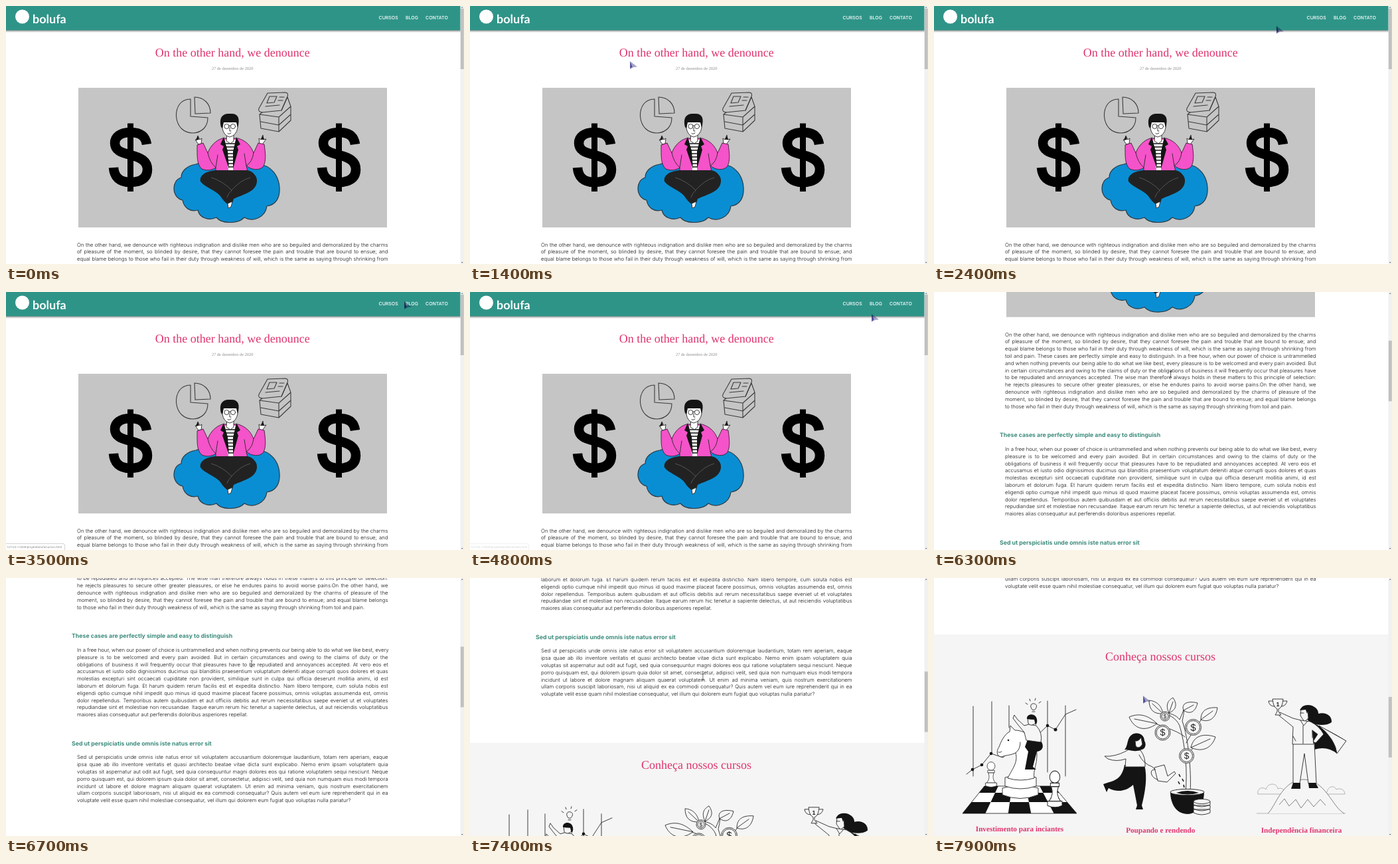
An HTML page that plays this animation: 690x388 px, repeating every 8 s.

```html
<!DOCTYPE html>
<html lang="pt-BR">
<head>
<meta charset="utf-8">
<title>Blog</title>
<style>
html, body { margin: 0; width: 100%; height: 100%; overflow: hidden; background: #fff; }
#stage { position: relative; width: 690px; height: 388px; overflow: hidden; background: #fff; text-rendering: geometricPrecision; }
#page, svg { position: absolute; left: 0; top: 0; }
svg { overflow: visible; }
#pointer { mix-blend-mode: multiply; }
.para { position: absolute; left: 107px; width: 468.5px; font: 300 7.75px/10.8px Inter, sans-serif; color: #111; }
.para div { white-space: nowrap; text-align: justify; text-align-last: justify; }
.para div:last-child { text-align-last: left; }
.nav { font: 500 7px Inter, sans-serif; fill: #fff; }
.title { font: 18px "Liberation Serif", serif; fill: #e0336e; text-anchor: middle; }
.date { font: 6.35px "Liberation Serif", serif; fill: #8a8a8a; text-anchor: middle; }
.head { font: 700 8.75px Inter, sans-serif; fill: #3d8c7c; }
.label { font: bold 11.2px "Liberation Serif", serif; fill: #e0336e; text-anchor: middle; }
.coin { font: 12px "Liberation Sans", sans-serif; fill: #222; text-anchor: middle; }
.status { font: 4.3px "Open Sans", sans-serif; fill: #777; }
.ln { fill: none; stroke: #2a2a2a; stroke-width: .9; stroke-linecap: round; stroke-linejoin: round; }
.wh { fill: #fff; stroke: #2a2a2a; stroke-width: .9; stroke-linejoin: round; }
.pl { fill: #f5f5f5; stroke: #2a2a2a; stroke-width: .9; stroke-linejoin: round; }
.bk { fill: #141414; }
.pale { fill: none; stroke: #999; stroke-width: .7; }
</style>
</head>
<body>
<div id="stage">
  <div id="page">
    <svg width="690" height="1140" viewBox="0 0 690 1140">
      <defs>
        <linearGradient id="shade" x2="0" y2="1">
          <stop stop-color="#000" stop-opacity=".45"/><stop offset="1" stop-color="#000" stop-opacity="0"/>
        </linearGradient>
        <g id="dollar">
          <path d="M212 208C210 195 201 190 187.500 190C172 190 164 197 164 206C164 217 173 220.500 187.500 224C203 228 213 233 213 246C213 259 203 265 187.500 265C171 265 163 257 162 243" fill="none" stroke="#000" stroke-width="14.500"/>
          <rect x="183" y="176.500" width="9" height="102.500"/>
        </g>
        <g id="pawn">
          <path class="wh" d="M-5 12C-2 19 -4 25 -8 29L8 29C4 25 2 19 5 12Z"/>
          <path class="wh" d="M-10 29H10V34Q0 38 -10 34Z"/>
          <path class="wh" d="M-6 8H6V12H-6Z"/>
          <circle class="wh" r="7" cy="1"/>
        </g>
      </defs>

      <rect y="36" width="685" height="4" fill="url(#shade)"/>
      <rect width="685" height="36.500" fill="#2f9488"/>
      <circle cx="24.500" cy="16" r="10.500" fill="#fff"/>
      <text x="40" y="25.500" style="font:700 18px Lato,sans-serif;fill:#fff">bolufa</text>
      <g class="nav">
        <text x="561.500" y="20">CURSOS</text><text x="602" y="20">BLOG</text><text x="632" y="20">CONTATO</text>
      </g>
      <text class="title" x="341.200" y="75.500">On the other hand, we denounce</text>
      <text class="date" x="341.200" y="96.300">27 de dezembro de 2020</text>

      <rect x="109" y="123" width="465" height="210" fill="#c5c5c5"/>
      <use href="#dollar"/><use href="#dollar" x="314"/>

      <!-- pie chart and papers -->
      <g class="ln" style="stroke:#3c3c3c;stroke-width:1.1">
        <path d="M278 140C263 140 256 152 256.500 166C258 182 268 191 282 191C296 190 304 181 304 168L278 166Z"/>
        <path d="M284 137C298 137 308 147 308 161L285 162Z"/>
        <path d="M394 131L421 130Q426 131 424 136L415 157L386 160Q379 159 381 154Z"/>
        <path d="M397 136l11 0l-4 9l-11 1ZM412 137h7M410 142h7M391 151l21 -2"/>
        <path d="M382 163L386 160M415 157L424 137L429 151L411 167L382 163L384 184L411 189L429 172V151M411 167V189M384 174L411 179L429 163"/>
      </g>

      <!-- figure on a cloud -->
      <path d="M264 258C249 262 249 288 266 292C268 304 278 310 289 307C292 320 307 323 317 318C326 329 351 327 359 318C373 326 391 317 393 301C407 299 413 288 412 273C411 255 399 239 380 238C360 234 300 232 286 238C273 240 264 248 264 258Z" fill="#0a8ed3" stroke="#2b3a44" stroke-width="1.200"/>
      <path class="wh" d="M290 208L285 201L288 202L289 195L292 201L295 199L294 207ZM382 207L381 199L384 201L387 194L388 201L392 200L386 208Z"/>
      <path class="bk" d="M286 201l3 -6l2 6ZM384 201l3 -6l2 6Z"/>
      <path d="M326 199C316 202 308 210 304 221L297 206L288 209C288 225 287 238 295 245C304 249 312 246 316 243L316 249L364 249L362 240C370 247 382 248 388 241C392 232 391 222 389 208L380 206L373 221C369 210 362 203 350 199Z" fill="#f553c9" stroke="#3a2037" stroke-width=".9"/>
      <path class="ln" d="M304 221Q307 235 316 243L319 224M373 221Q371 235 362 240L359 222"/>
      <path d="M330 201H346L342 247H335Z" fill="#fff"/>
      <path d="M331 207H345M332 212H345M333 217H344M333 222H344M334 227H343M334 232H343M335 237H343M335 242H342" stroke="#151515" stroke-width="1.500"/>
      <path class="bk" d="M328 197L323 208L328 211L326 216L336 245L334 218ZM347 197L353 208L348 211L350 216L342 245L342 219Z"/>
      <path class="wh" d="M333 190H343V203L338 207L332 203Z"/>
      <path class="wh" d="M326 173V184Q328 195 337 197Q347 195 349 183V173Z"/>
      <path class="bk" d="M324 182C320 166 328 161 338 162C350 161 353 169 349 183L347 175L328 175L326 184Z"/>
      <g class="ln"><circle cx="332.500" cy="181" r="3.600"/><circle cx="342" cy="181" r="3.600"/><path d="M336.500 180h2M337 183v5h2M334 192q3 1 5 -1"/></g>
      <path fill="#222" d="M316 247C298 249 291 256 293 264C300 273 316 277 323 286C327 292 331 296 335 299L341 296L343 290C355 284 377 280 378 264C379 254 368 246 362 247Z"/>
      <path d="M309 258Q326 263 340 277Q353 262 368 258M340 277Q334 283 333 288" fill="none" stroke="#777" stroke-width=".6"/>
      <path class="wh" d="M334 297L341 294L339 302L335 304Z"/>

      <text class="head" x="99" y="513.700">These cases are perfectly simple and easy to distinguish</text>
      <text class="head" x="99" y="675">Sed ut perspiciatis unde omnis iste natus error sit</text>

      <rect y="830.500" width="685" height="320" fill="#f5f5f5"/>
      <g transform="translate(0 745.5)">
        <text class="title" x="341" y="124">Conheça nossos cursos</text>
        <text class="label" x="129" y="380.800">Investimento para inciantes</text>
        <text class="label" x="341.300" y="382.600">Poupando e rendendo</text>
        <text class="label" x="553.500" y="382.600">Independência financeira</text>

        <!-- chess -->
        <path class="ln" d="M59 193V298M87 186V262M113 192V225M171 185V292M198 192V298"/>
        <path class="ln" d="M49 295L58 288L72 281L86 264L104 270L120 255M152 240L171 222L183 228L198 205L214 198"/>
        <g class="bk"><circle cx="58" cy="288" r="2.300"/><circle cx="72" cy="281" r="2.300"/><circle cx="86" cy="264" r="2.300"/><circle cx="171" cy="222" r="2.300"/><circle cx="183" cy="228" r="2.500"/></g>
        <path class="wh" d="M76 313H180L215 354H43Z"/>
        <path id="board" class="bk"/>
        <use href="#pawn" transform="translate(86 282) scale(.85 .9)"/>
        <use href="#pawn" transform="translate(182 298) scale(1.1 1.3)"/>
        <path class="wh" d="M103 316Q130 308 157 316V326Q130 337 103 326Z"/>
        <path class="wh" d="M107 300Q130 293 154 300V313Q130 321 107 313Z"/>
        <path class="wh" d="M111 301C118 287 127 277 123 263C115 267 108 266 102 269C95 269 93 261 98 254C101 246 106 235 114 231L115 222L122 229C143 229 155 248 155 266C155 282 149 289 151 301Q130 307 111 301Z"/>
        <circle class="bk" cx="112" cy="244" r="1.300"/>
        <path class="ln" d="M97 262q3 1 5 -1M123 263Q130 258 130 247"/>
        <path class="bk" d="M141 243L160 244C167 252 164 260 155 261L149 284L154 288H137L142 261L137 254Z"/>
        <path class="pl" d="M143 220L154 222Q164 233 161 247L139 244L136 232L126 220L119 211L121 206L126 213L136 222Z"/>
        <path class="pl" d="M141 210H153V218Q147 224 142 219Z"/>
        <path class="bk" d="M140 212C139 205 149 203 153 208C156 212 156 218 153 221L151 213Q145 213 140 212Z"/>
        <path class="ln" d="M148 198C143 192 147 188 151 189C156 190 155 195 152 198ZM148 201H152M141 190l-3 -2M145 185l-1 -3M152 184l1 -3M158 188l3 -2"/>

        <!-- money plant -->
        <path class="pl" d="M379 323C382 292 379 252 370 222C364 209 352 205 343 202C356 203 365 206 370 213Q374 204 377 196Q376 208 374 215C383 240 388 290 386 323Z"/>
        <path class="ln" d="M378 239Q368 230 330 218M380 248Q387 235 404 211M384 276Q380 261 398 249"/>
        <g class="pl">
          <path d="M336 219C318 202 304 205 294 209C300 224 315 234 336 219Z"/>
          <path d="M345 204C342 189 333 185 324 184C324 198 331 205 345 204Z"/>
          <path d="M354 203C348 190 353 184 360 180C367 190 365 198 354 203Z"/>
          <path d="M376 199C372 189 382 184 397 188C394 201 386 206 376 199Z"/>
          <path d="M402 213C402 198 413 194 427 195C425 211 414 218 402 213Z"/>
          <path d="M387 255C391 237 406 233 424 239C419 255 405 263 387 255Z"/>
        </g>
        <path class="ln" d="M336 219L302 212M345 204L329 189M354 203L360 186M376 199L391 191M402 213L420 200M387 255L416 242"/>
        <g id="coins"></g>
        <path class="bk" d="M356 321Q382 313 407 321C407 339 399 354 382 355C366 355 356 341 356 321Z"/>
        <ellipse class="pl" cx="381.500" cy="322" rx="25.500" ry="4.500"/>
        <path class="bk" d="M365 323Q382 317 399 323Q382 328 365 323Z"/>
        <path d="M369 295l2 4M374 302l2 4M368 306l2 4M376 311l1 4" stroke="#141414" stroke-width="1.600"/>
        <g class="pl"><path d="M391 348v5q12 6 25 0v-5ZM391 342v5q12 6 25 0v-5ZM391 336v5q12 6 25 0v-5Z"/><ellipse cx="403.500" cy="336" rx="12.500" ry="3.500"/></g>
        <path class="pl" d="M332 285L347 281L352 298L362 291L364 294L351 307L337 305Z"/>
        <path class="ln" d="M333 288Q325 288 328 296Q331 302 337 303"/>
        <path class="bk" d="M287 281L317 281C322 300 318 322 313 342L315 348H304L306 342L300 311C288 322 274 322 263 316L260 322L255 310L264 307C276 304 284 298 287 281Z"/>
        <path class="pl" d="M295 257L311 259Q319 269 318 284H288L289 272Q275 277 262 272L257 268L265 268Q281 266 295 257Z"/>
        <path class="ln" d="M309 266Q315 279 329 284L333 288"/>
        <path class="bk" d="M299 235C307 231 317 235 317 245C320 249 319 257 313 258C302 263 294 258 287 258C293 252 290 240 299 235Z"/>
        <path class="pl" d="M303 245Q308 246 312 240L314 250Q309 258 304 253Z"/>

        <!-- heroine -->
        <path class="pale" d="M488 325C486 316 496 313 500 318C503 307 517 308 518 317C525 314 530 320 526 325ZM592 322C594 312 604 312 606 318C613 315 619 319 619 325H590ZM486 354H620"/>
        <path d="M503 354C514 345 524 304 556 303C590 303 600 345 618 354M520 341L528 332L535 343L545 333L553 346L563 333L572 344L582 333L590 342" fill="#f5f5f5" stroke="#666" stroke-width=".8"/>
        <path class="bk" d="M566 216C580 222 601 232 621 245L607 264Q592 252 573 258Z"/>
        <path class="pl" d="M580 222L621 245L607 264Q605 243 580 222Z"/>
        <path class="bk" d="M558 192C568 188 580 196 579 204C590 201 600 207 599 217C590 223 578 221 570 219C562 214 558 207 553 201Z"/>
        <path class="pl" d="M553 197L563 198L564 211L558 216L552 207Z"/>
        <path class="bk" d="M551 199Q557 187 566 195L562 204L560 198Z"/>
        <path class="pl" d="M541 248H573L576 309H564L558 264L551 309H541Z"/>
        <path class="pl" d="M521 202L541 211L553 214L567 216Q581 223 587 235L575 248L571 246L578 235L570 229L572 250H540L541 224L520 207Z"/>
        <path class="ln" d="M552 214L557 222L563 215M556 222V249M541 238L545 245M570 229V240M552 203h5"/>
        <path class="bk" d="M541 308H552V317H538ZM564 308H575L579 316H565Z"/>
        <path class="pl" d="M510 182H526Q525 195 519 197V201L523 206H514L517 201V197Q511 194 510 182ZM510 185H504Q505 193 513 193M526 185H532Q530 193 523 193"/>
        <text class="coin" x="518" y="193" style="font-size:9px;font-weight:bold">1</text>
      </g>
    </svg>
    <div id="text"></div>
  </div>

  <svg width="690" height="388" viewBox="0 0 690 388">
    <rect x="684.500" width="5.500" height="388" fill="#f1f1f1"/>
    <path d="M685.700 2.700L687.200 1.200L688.700 2.700ZM685.700 385L687.200 386.500L688.700 385Z" fill="#666"/>
    <rect id="thumb" x="684.800" width="5" height="91" fill="#c1c1c1"/>
    <g id="status">
      <path d="M-1 378.500H86Q88.500 378.500 88.500 381V389H-1Z" fill="#fff" stroke="#c8c8c8" stroke-width=".8"/>
      <text id="url" class="status" x="1" y="385.300"></text>
    </g>
  </svg>
  <svg id="pointer" width="690" height="388" viewBox="0 0 690 388">
    <g id="arrow">
      <path d="M0 0L11 8.500L5.500 9L0 12Z" fill="#a5a3c8"/>
      <path d="M.3 .5V11L3.500 8.500Z" fill="#4a4b9a"/>
    </g>
    <path id="beam" d="M2.500 0Q4 0 4 1.200Q4 0 5.500 0M4 1V9M2.500 10Q4 10 4 8.800Q4 10 5.500 10" fill="none" stroke="#444" stroke-width=".8"/>
  </svg>
</div>

<script>
const $ = id => document.getElementById(id);
const LOOP = 8000, TICK = 100;

const paras = [
  [353.6, `On the other hand, we denounce with righteous indignation and dislike men who are so beguiled and demoralized by the charms
of pleasure of the moment, so blinded by desire, that they cannot foresee the pain and trouble that are bound to ensue; and
equal blame belongs to those who fail in their duty through weakness of will, which is the same as saying through shrinking from
toil and pain. These cases are perfectly simple and easy to distinguish. In a free hour, when our power of choice is untrammelled
and when nothing prevents our being able to do what we like best, every pleasure is to be welcomed and every pain avoided. But
in certain circumstances and owing to the claims of duty or the obligations of business it will frequently occur that pleasures have
to be repudiated and annoyances accepted. The wise man therefore always holds in these matters to this principle of selection:
he rejects pleasures to secure other greater pleasures, or else he endures pains to avoid worse pains.On the other hand, we
denounce with righteous indignation and dislike men who are so beguiled and demoralized by the charms of pleasure of the
moment, so blinded by desire, that they cannot foresee the pain and trouble that are bound to ensue; and equal blame belongs
to those who fail in their duty through weakness of will, which is the same as saying through shrinking from toil and pain.`],
  [526.1, `In a free hour, when our power of choice is untrammelled and when nothing prevents our being able to do what we like best, every
pleasure is to be welcomed and every pain avoided. But in certain circumstances and owing to the claims of duty or the
obligations of business it will frequently occur that pleasures have to be repudiated and annoyances accepted. At vero eos et
accusamus et iusto odio dignissimos ducimus qui blanditiis praesentium voluptatum deleniti atque corrupti quos dolores et quas
molestias excepturi sint occaecati cupiditate non provident, similique sunt in culpa qui officia deserunt mollitia animi, id est
laborum et dolorum fuga. Et harum quidem rerum facilis est et expedita distinctio. Nam libero tempore, cum soluta nobis est
eligendi optio cumque nihil impedit quo minus id quod maxime placeat facere possimus, omnis voluptas assumenda est, omnis
dolor repellendus. Temporibus autem quibusdam et aut officiis debitis aut rerum necessitatibus saepe eveniet ut et voluptates
repudiandae sint et molestiae non recusandae. Itaque earum rerum hic tenetur a sapiente delectus, ut aut reiciendis voluptatibus
maiores alias consequatur aut perferendis doloribus asperiores repellat.`],
  [687.4, `Sed ut perspiciatis unde omnis iste natus error sit voluptatem accusantium doloremque laudantium, totam rem aperiam, eaque
ipsa quae ab illo inventore veritatis et quasi architecto beatae vitae dicta sunt explicabo. Nemo enim ipsam voluptatem quia
voluptas sit aspernatur aut odit aut fugit, sed quia consequuntur magni dolores eos qui ratione voluptatem sequi nesciunt. Neque
porro quisquam est, qui dolorem ipsum quia dolor sit amet, consectetur, adipisci velit, sed quia non numquam eius modi tempora
incidunt ut labore et dolore magnam aliquam quaerat voluptatem. Ut enim ad minima veniam, quis nostrum exercitationem
ullam corporis suscipit laboriosam, nisi ut aliquid ex ea commodi consequatur? Quis autem vel eum iure reprehenderit qui in ea
voluptate velit esse quam nihil molestiae consequatur, vel illum qui dolorem eum fugiat quo voluptas nulla pariatur?`]
].map(([top, text]) => ({ top, lines: text.split('\n') }));

$('text').innerHTML = paras.map(p =>
  `<div class="para" style="top:${p.top}px">${p.lines.map(l => `<div>${l}</div>`).join('')}</div>`).join('');

// Checkerboard in perspective
const rows = [313, 323, 337, 354];
const boardX = (col, y) => {
  const k = (y - 313) / 41;
  return 76 - 33 * k + col / 5 * (104 + 68 * k);
};
let squares = '';
for (let r = 0; r < 3; r++)
  for (let c = r % 2; c < 5; c += 2) {
    const [a, b] = [rows[r], rows[r + 1]];
    squares += `M${boardX(c, a)} ${a}L${boardX(c + 1, a)} ${a}L${boardX(c + 1, b)} ${b}L${boardX(c, b)} ${b}Z`;
  }
$('board').setAttribute('d', squares);

$('coins').innerHTML = [[348, 208, 7], [344.5, 232.5, 11.5], [390.5, 224.5, 12], [380.5, 267.5, 11]].map(([x, y, r]) =>
  `<circle class="pl" cx="${x}" cy="${y}" r="${r}"/><circle class="pl" cx="${x}" cy="${y}" r="${r - 2}"/>
   <text class="coin" x="${x}" y="${y + r * .43}" style="font-size:${r * 1.25}px">$</text>`).join('');

// Keys: time, then values
const scrollKeys = [[5200, 0], [5800, 135], [6700, 423.5], [6950, 485], [7100, 485], [7900, 745.5]];
const mouseKeys = [[500, 306, 201], [600, 314, 201], [800, 314, 201], [1400, 241, 83], [1700, 241, 83],
  [2500, 555, 22], [2800, 568, 15], [3500, 600, 14], [4000, 640, 14], [4300, 652, 16],
  [4800, 605, 33], [5200, 520, 60], [5800, 336, 112], [6700, 366, 124], [7100, 366, 124], [7900, 315, 177]];

function at(keys, t) {
  if (t <= keys[0][0]) return keys[0].slice(1);
  const i = keys.findIndex(k => k[0] >= t);
  if (i < 0) return keys[keys.length - 1].slice(1);
  const [a, b] = [keys[i - 1], keys[i]];
  const k = (t - a[0]) / (b[0] - a[0]);
  return a.slice(1).map((v, j) => v + (b[j + 1] - v) * k);
}

function draw(t) {
  const [scroll] = at(scrollKeys, t);
  const [x, y] = at(mouseKeys, t);
  $('page').style.transform = `translateY(${-scroll}px)`;
  $('thumb').setAttribute('y', 4 + scroll * .2345);

  const overText = paras.some(p => {
    const d = y + scroll + 5 - p.top;
    return x > 107 && x < 575 && d > 0 && d < p.lines.length * 10.8;
  });
  for (const [id, on] of [['arrow', !overText], ['beam', overText]]) {
    $(id).setAttribute('transform', `translate(${x} ${y})`);
    $(id).setAttribute('visibility', on && t >= 500 ? 'visible' : 'hidden');
  }

  const file = t < 3600 ? 'cursos' : t < 4000 ? 'blog' : 'contato';
  $('url').textContent = `127.0.0.1:5500/projetobolufa/${file}.html`;
  $('status').setAttribute('opacity', t < 2800 || t > 4800 ? 0 : t < 4700 ? 1 : t < 4800 ? .7 : .35);
}

const start = performance.now();
function frame() {
  const t = (performance.now() - start) % LOOP;
  draw(Math.floor(t / TICK) * TICK);
  requestAnimationFrame(frame);
}
frame();
</script>
</body>
</html>
```
